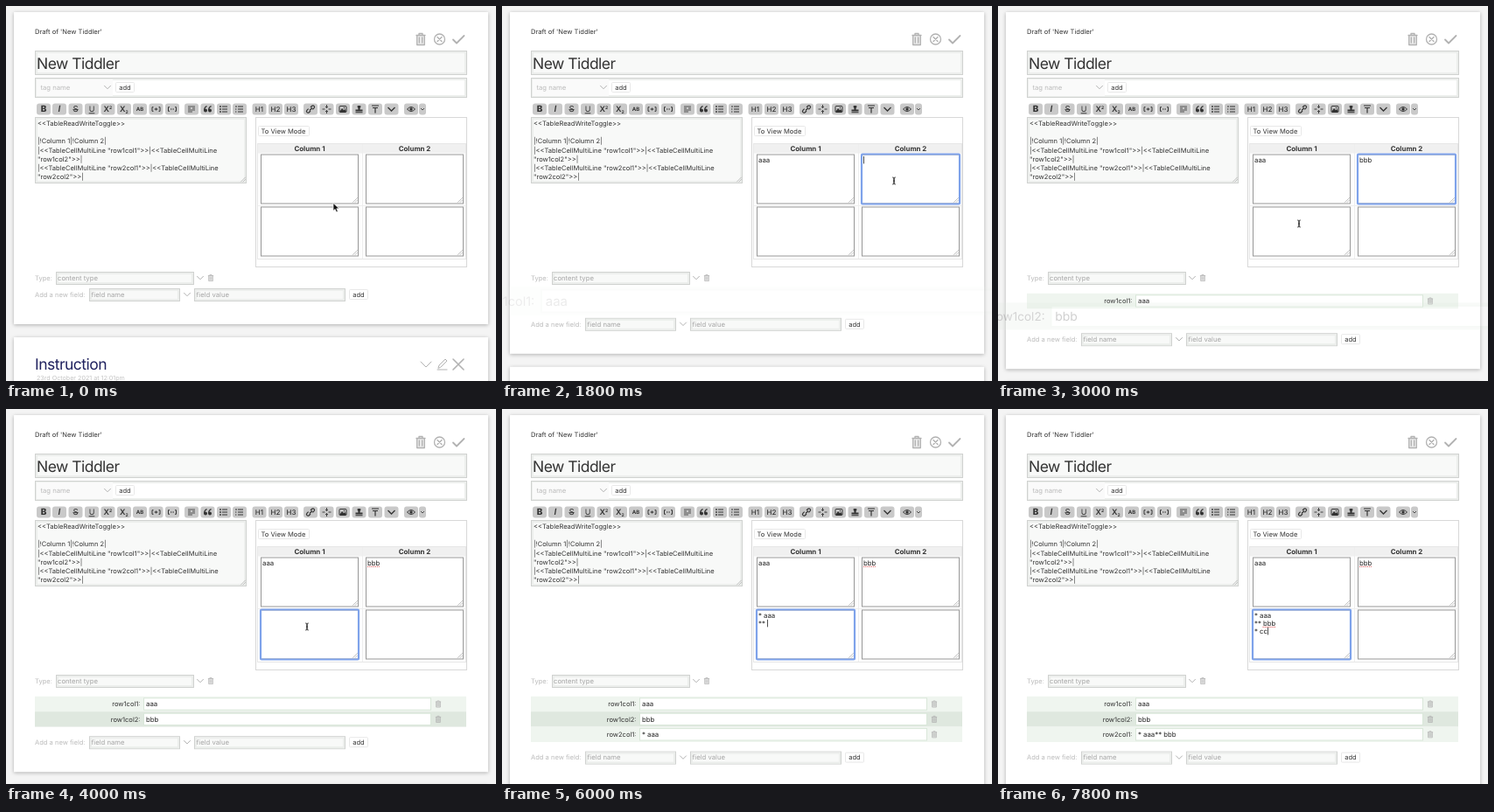
These frames come from a looping animation (560x429 px, 8 s). An HTML page:

```html
<!DOCTYPE html>
<html lang="en">
<head>
<meta charset="utf-8">
<title>Table editor</title>
<style>
html, body { margin: 0; width: 100%; height: 100%; overflow: hidden; background: #f4f4f4; }
svg { display: block; width: 560px; height: 429px; }
text { font: 7.55px Inter, "Open Sans", sans-serif; fill: #333; white-space: pre; text-rendering: geometricPrecision; }
.panel { fill: #fff; filter: drop-shadow(.5px 1px 2px rgba(0, 0, 0, .28)); }
.field { fill: #f8f9f8; stroke: #d0d2d0; }
.plain { fill: #fff; stroke: #d8d8d8; }
.button { fill: #fff; stroke: #e8e8e8; }
.shade { fill: none; stroke: #eceeec; stroke-width: 2; }
.line { fill: none; stroke: #b2b2b2; stroke-linecap: round; stroke-linejoin: round; }
.ink { fill: none; stroke: #333; }
.key { fill: #c9c9c9; }
.cell { fill: #fff; stroke: #979797; }
.typed { font-size: 7.8px; fill: #222; }
.title { font-size: 17.5px; letter-spacing: -.03em; }
</style>
</head>
<body>
<svg id="stage" viewBox="0 0 560 429" xmlns="http://www.w3.org/2000/svg"></svg>
<script>
const stage = document.getElementById('stage');
const LOOP = 8000, STEP = 200, ROW = 17.4;

const escape = s => s.replace(/&/g, '&amp;').replace(/</g, '&lt;');
const rect = (x, y, w, h, cls, extra = '') =>
  `<rect x="${x}" y="${y}" width="${w}" height="${h}" class="${cls}" ${extra}/>`;
const text = (x, y, s, extra = '') => `<text x="${x}" y="${y}" ${extra}>${escape(s)}</text>`;
const path = (d, cls = 'line', extra = '') => `<path d="${d}" class="${cls}" ${extra}/>`;
const at = (x, y, body, scale = 1) => `<g transform="translate(${x} ${y}) scale(${scale})">${body}</g>`;
const style = s => `style="${s}"`;

const pale = style('fill:#bbb');
const hint = style('fill:#a5a5a5;font-size:7.7px');
const middle = 'text-anchor="middle"';

const field = (x, y, w, h, extra = '') =>
  rect(x + .5, y + .5, w - 1, h - 1, 'field', extra) + rect(x + 2, y + 2, w - 4, h - 4, 'shade');
const chevron = (x, y, r) => path(`M${x - r} ${y - r / 2}l${r} ${r}l${r} ${-r}`);
const grip = (x, y) => path(`M${x - 5} ${y}l5 -5M${x - 2.5} ${y}l2.5 -2.5`, 'line', 'stroke-width=".8"');
const trash = (x, y, scale) => at(x, y,
  path('M-5 -4.5h10M-2 -4.5v-2h4v2M-4.3 -4.5v11h8.6v-11M-1.7 -2v6M1.7 -2v6', 'line', 'stroke-width="1.3"') +
  rect(-4, -4, 8, 10, '', 'fill="#aaa" opacity=".25"'), scale);
const addButton = (x, y) =>
  rect(x + .5, y - 5.5, 21, 11, 'button', 'rx="1"') + text(x + 11, y + 2.7, 'add', middle);

function toolbar() {
  const glyph = (s, css) => text(0, 3.3, s, `${middle} ${style(css)}`);
  const script = (shift) => text(-5, 3.3, 'X', style('font-size:9px;font-weight:600')) +
    text(1.6, 3.3 + shift, '2', style('font-size:5px;font-weight:700'));
  const bars = 'M-2 -3h6M-2 0h6M-2 3h6';
  const brackets = inner => path('M-3 -2.3h-1.5v4.6h1.5M3 -2.3h1.5v4.6h-1.5' + inner, 'ink');
  const heading = n => glyph('H' + n, 'font-size:8px;font-weight:500');
  const dot = (x, y, r) => `<circle cx="${x}" cy="${y}" r="${r}" fill="#333"/>`;
  const comma = x => dot(x, 1.6, 2) + path(`M${x - 1.4} 1.6q0 -4 3 -5`, 'ink', 'stroke-width="1.3"');
  const keys = [
    [43, glyph('B', 'font-size:10px;font-weight:800')],
    [61, glyph('I', 'font-size:10px;font-weight:600;font-style:italic')],
    [79.5, glyph('S', 'font-size:9.5px;text-decoration:line-through')],
    [98, glyph('U', 'font-size:9px;text-decoration:underline')],
    [116.5, script(-3.5)],
    [135, script(1.5)],
    [153, text(0, 2.3, 'AB', `${middle} ${style('font-size:6px;font-weight:700')}`)],
    [171.5, brackets('M-2 0h4M0 -1.5v3')],
    [190, brackets('M-2 0h1.5M.5 0h1.5')],
    [212, path('M-4 -3h8M-4 -1h3M1 -1h3M-4 1h8M-4 3h5', 'ink', 'stroke-width=".8"')],
    [230.5, comma(-2.5) + comma(2.5)],
    [249, path(bars, 'ink') + [-3, 0, 3].map(y => dot(-4, y, .9)).join('')],
    [267, path(bars + 'M-4 -4v2M-5 0h1.4M-5 3h1.4', 'ink')],
    [289.5, heading(1)], [308, heading(2)], [326, heading(3)],
    [348, path('M-1 1.5l3 -3M0 -2l1.7 -1.7a1.7 1.7 0 0 1 2.4 2.4l-1.7 1.7M0 2l-1.7 1.7a1.7 1.7 0 0 1 -2.4 -2.4l1.7 -1.7', 'ink', 'stroke-width="1.2"')],
    [366.5, path('M0 -5v3.5m-1.5 -1.5l1.5 1.5l1.5 -1.5M0 5v-3.5m-1.5 1.5l1.5 -1.5l1.5 1.5M-5 0h3M2 0h3', 'ink', 'stroke-width=".9"')],
    [385, rect(-4, -3.5, 8, 7, 'ink', 'rx="1"') + path('M-4 3l3 -4l2 2l1.5 -1l1.5 3z', '', 'fill="#333"') + dot(1.5, -1.5, .8)],
    [403.5, path('M-1 -4h2a1 1 0 0 1 1 1l-1 2.5v1h3v2h-8v-2h3v-1l-1 -2.5a1 1 0 0 1 1 -1M-4 3.2h8v1h-8z', '', 'fill="#333"')],
    [422, path('M-4 -4h8M-3 -1.5h6M0 -1.5v6', 'ink', 'stroke-width="1.2"')],
    [440.5, path('M-4 -2l4 4l4 -4', 'ink', 'stroke-width="1.3"')],
    [463, path('M-4.5 0q4.5 -5 9 0q-4.5 5 -9 0z', 'ink') + dot(0, 0, 1.7)],
  ];
  const narrow = rect(472, 111.5, 8, 13, 'key', 'rx="3"') + path('M474 117l2 2l2 -2', 'ink', 'stroke-width=".8"');
  return keys.map(([x, icon]) => at(x, 118, rect(-8, -6.5, 16, 13, 'key', 'rx="3"') + icon)).join('') + narrow;
}

const source = [
  '<<TableReadWriteToggle>>', '', '|!Column 1|!Column 2|',
  '|<<TableCellMultiLine "row1col1">>|<<TableCellMultiLine', '"row1col2">>|',
  '|<<TableCellMultiLine "row2col1">>|<<TableCellMultiLine', '"row2col2">>|',
];

const cells = [[291, 170], [411, 170], [291, 230], [411, 230]];

const table =
  rect(285.5, 127.5, 241, 171, 'plain') +
  rect(288.5, 137.5, 58, 11, 'button', 'rx="1"') + text(291.5, 145.9, 'To View Mode') +
  rect(287.5, 157.5, 238, 132, 'ink', style('stroke:#e6e6e6')) +
  rect(288, 158, 237, 10.5, '', 'fill="#f0f0f0"') +
  path('M407.5 158v131M288 228.5h237', '', 'stroke="#eee"') +
  ['Column 1', 'Column 2'].map((s, i) =>
    text(347 + i * 120, 166.3, s, `${middle} ${style('font-size:7.9px;font-weight:700')}`)).join('') +
  cells.map(([x, y]) => rect(x + .5, y, 111, 56, 'cell') + grip(x + 110.5, y + 54.5)).join('');

function fieldRow(name, i) {
  return `<g class="row">` +
    rect(33, -8.7, 493, ROW, '', `fill="${i % 2 ? '#dfe8df' : '#eff5ef'}"`) +
    text(153.5, 2.7, name + ':', 'text-anchor="end"') +
    rect(157.5, -6.7, 328, 13.4, 'plain', style('stroke:#d9e7d9')) +
    text(160, 2.8, '', 'class="typed value"') + trash(494, 0, .55) + `</g>`;
}

stage.innerHTML =
  rect(0, 0, 560, 429, '', 'fill="#f4f4f4"') +
  `<g id="next">` + rect(9, 0, 542, 90, 'panel') +
    text(33, 36.5, 'Instruction', `class="title" ${style('fill:#20225f')}`) +
    text(35, 49.3, '23rd October 2021 at 12:01pm', style('fill:#c4c4c4;font-size:7.15px')) +
    at(0, 31, chevron(480, 0, 6) +
      path('M494 4l1 -3l7 -7l2 2l-7 7zM493 6h11', 'line') +
      path('M511 -6l12 12M523 -6l-12 12', 'line', 'stroke-width="1.6"')) + `</g>` +
  `<rect id="draft" x="9" y="7" width="542" height="357" class="panel"/>` +
  text(33, 32, "Draft of 'New Tiddler'") +
  trash(474, 38, 1) +
  `<circle cx="495.5" cy="38" r="6" class="line" stroke-width="1.3"/>` +
  path('M493 35.5l5 5M498 35.5l-5 5', 'line', 'stroke-width="1.4"') +
  path('M511 38.5l4 4l8.5 -8.5', 'line', 'stroke-width="1.8"') +
  field(33, 51, 494, 28) + text(35, 71.5, 'New Tiddler', 'class="title"') +
  field(33, 82, 494, 23, style('fill:#fff')) + rect(35, 84, 87, 19, '', 'fill="#fafafa"') +
  text(39.5, 95.8, 'tag name', style('fill:#bbb;font-size:7.7px')) + chevron(116, 93, 3.5) + addButton(125, 93) +
  toolbar() +
  field(33, 127, 242, 76) + source.map((s, i) => text(36, 137 + i * 10.2, s)).join('') +
  grip(273.5, 201) +
  table +
  text(33, 313.5, 'Type:', pale) + field(57, 304, 158, 15) + text(59, 313.8, 'content type', hint) +
  chevron(222, 311, 3.5) + trash(234, 311, .55) +
  `<g id="adder">` + text(33, 2.7, 'Add a new field:', pale) +
    field(95, -7, 104, 15) + text(97.5, 2.8, 'field name', hint) + chevron(207, 0, 3.5) +
    field(215, -7, 173, 15) + text(217.5, 2.8, 'field value', hint) + addButton(392, 0) + `</g>` +
  ['row1col1', 'row1col2', 'row2col1'].map(fieldRow).join('') +
  `<rect id="focus" width="112" height="57" fill="none" stroke="#7ea2ea" stroke-width="2.2" rx="1"/>` +
  cells.slice(0, 3).map(([x, y]) => `<g class="content">` +
    [0, 1, 2].map(i => text(x + 2, y + 8.6 + i * 9, '', 'class="typed"')).join('') + `</g>`).join('') +
  `<path id="caret" d="M0 -6.7v8.5" stroke="#222" stroke-width=".8"/>` +
  `<g id="spelling" stroke="#e04040" stroke-width=".9" stroke-dasharray="1.2 1">` +
    path('M413 180.3h14', '') + path('M302.5 249.4h15', '') + `</g>` +
  path('M-1 -.5v8.8l2.1 -1.9l1.5 3.4l1.7 -.7l-1.5 -3.3h2.9z', '', 'id="arrow" fill="#111" stroke="#fff" stroke-width=".7"') +
  path('M-1.8 -4q1.8 0 1.8 1v6q0 1 -1.8 1M1.8 -4q-1.8 0 -1.8 1v6q0 1 1.8 1M-1 0h2', 'ink', 'id="beam" stroke-width="1"');

const $ = id => document.getElementById(id);
const all = (sel, root = stage) => [...root.querySelectorAll(sel)];
const show = (el, on) => el.setAttribute('visibility', on ? 'visible' : 'hidden');
const move = (el, x, y) => el.setAttribute('transform', `translate(${x} ${y})`);

const rows = all('.row');
const values = rows.map(row => row.querySelector('.value'));
const contents = all('.content').map(g => all('text', g));
const marks = all('path', $('spelling'));

// One character is typed per step: cell, first key time, characters.
const typing = [
  [0, 800, 'aaa'], [1, 2000, 'bbb'], [2, 4200, '* aaa'],
  [2, 5400, '\n** bbb'], [2, 7000, '\n* cc'],
];
const popStart = [1730, 2882, 5320];
const mousePath = [
  [0, 375, 226], [200, 375, 226], [600, 350, 200], [1400, 350, 200],
  [1800, 448, 200], [2600, 448, 200], [3000, 344, 249], [LOOP, 344, 249],
];

const typedIn = (cell, t) => typing.filter(k => k[0] === cell).map(([, start, chars]) =>
  chars.slice(0, Math.max(0, Math.floor((t - start) / STEP) + 1))).join('');
const smooth = p => p * p * (3 - 2 * p);

function drawMouse(t) {
  const i = Math.max(1, mousePath.findIndex(k => k[0] >= t));
  const [t0, x0, y0] = mousePath[i - 1], [t1, x1, y1] = mousePath[i];
  const p = smooth((t - t0) / (t1 - t0));
  const visible = t < 800 || (t >= 1400 && t < 2000) || (t >= 2600 && t < 4200);
  show($('arrow'), visible && t < 400);
  show($('beam'), visible && t >= 400);
  for (const id of ['arrow', 'beam']) move($(id), x0 + (x1 - x0) * p, y0 + (y1 - y0) * p);
}

function drawRows(t) {
  const shown = popStart.filter(start => t >= start).length;
  const grow = shown ? 16.4 + shown * ROW : 0;
  $('draft').setAttribute('height', 357 + grow);
  move($('next'), 0, 379 + grow);
  move($('adder'), 0, 330 + grow);
  rows.forEach((row, i) => {
    const p = smooth(Math.min(1, Math.max(0, (t - popStart[i]) / 400)));
    show(row, t >= popStart[i]);
    row.setAttribute('opacity', p);
    row.setAttribute('transform', `translate(280 ${337.5 + i * ROW}) scale(${2 - p}) translate(-280 0)`);
  });
  ['aaa', 'bbb', t < 7000 ? '* aaa' : '* aaa** bbb'].forEach((s, i) => values[i].textContent = s);
}

function drawCells(t) {
  const focus = t < 600 ? -1 : t < 1600 ? 0 : t < 3200 ? 1 : 2;
  contents.forEach((lines, cell) => {
    const parts = typedIn(cell, t).split('\n');
    lines.forEach((line, i) => line.textContent = parts[i] || '');
    if (cell !== focus) return;
    const last = lines[parts.length - 1];
    const width = last.textContent ? last.getComputedTextLength() : 0;
    move($('caret'), +last.getAttribute('x') + width + .5, last.getAttribute('y'));
  });
  show($('focus'), focus >= 0);
  if (focus >= 0) move($('focus'), cells[focus][0], cells[focus][1] - .5);
  const blinkOff = (t >= 2800 && t < 3200) || (t >= 3800 && t < 4200);
  show($('caret'), focus >= 0 && !blinkOff);
  show(marks[0], t >= 3200);
  show(marks[1], t >= 7000);
}

const started = performance.now();
function frame() {
  const t = Math.floor((performance.now() - started) % LOOP / STEP) * STEP;
  drawRows(t);
  drawCells(t);
  drawMouse(t);
  requestAnimationFrame(frame);
}
frame();
</script>
</body>
</html>
```
